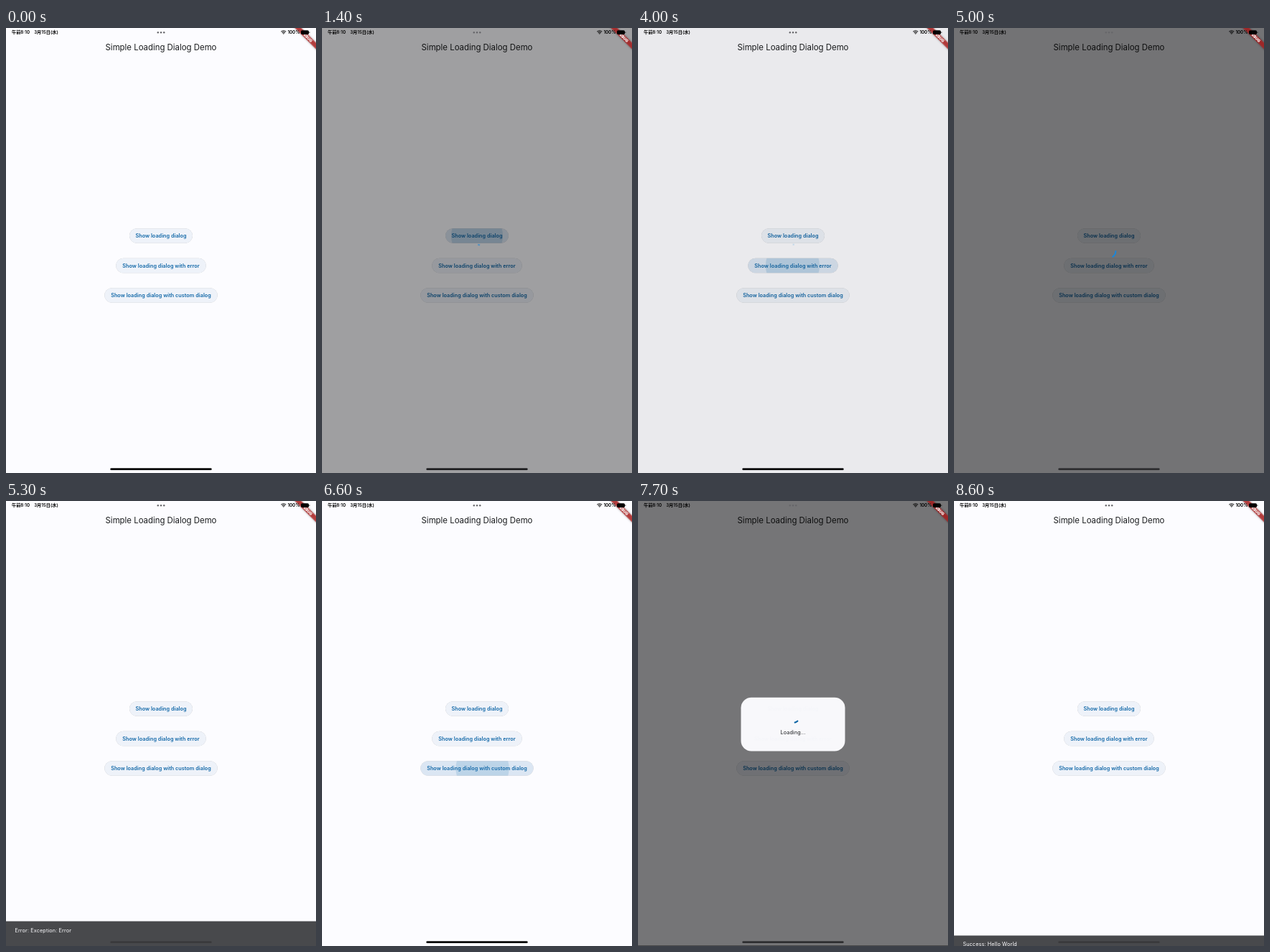
These frames come from a looping animation (432 by 620 pixels, 8.7 s). An HTML page:

```html
<!DOCTYPE html>
<html lang="en">
<head>
<meta charset="utf-8">
<title>Simple Loading Dialog Demo</title>
<style>
  html, body { margin: 0; width: 100%; height: 100%; overflow: hidden; background: #fcfcff; }
  svg { display: block; width: 432px; height: 620px; }
  text { font-family: Inter, "Noto Sans CJK JP", "Noto Sans CJK", sans-serif; fill: #1a1c1e; }
  .mid { text-anchor: middle; }
  .pill { fill: #eef2f9; filter: drop-shadow(0 .6px .5px rgba(0, 0, 0, .28)); }
  .label { font-size: 7.25px; font-weight: 600; fill: #1268a8; letter-spacing: .03px; }
  .small { font-size: 7.25px; letter-spacing: .13px; }
  .status text { font-size: 6.2px; font-weight: 600; fill: #000; }
  .arc { fill: none; stroke-width: 2.07; stroke-linecap: square; }
</style>
</head>
<body>
<svg viewBox="0 0 432 620">
  <rect width="432" height="620" fill="#fcfcff"/>
  <text class="mid" x="216" y="31.3" font-size="11.4">Simple Loading Dialog Demo</text>
  <g id="buttons"></g>

  <g id="snack">
    <rect width="432" height="36" fill="#48494c"/>
    <text id="message" class="small" x="12.4" y="15" style="fill:#fcfcff"></text>
  </g>

  <rect id="barrier" width="432" height="620"/>

  <g id="plain"><path class="arc" stroke="#1b86d8"/></g>
  <g id="card">
    <rect x="143.5" y="273.8" width="145" height="74.6" rx="14.5" fill="#fcfcff"/>
    <path class="arc" stroke="#0061a4"/>
    <text class="small mid" x="216" y="325.3">Loading...</text>
  </g>

  <g transform="translate(432 0) rotate(45)">
    <rect x="-32" y="14.5" width="64" height="6.2" fill="#b71c1c" fill-opacity=".76"
      style="filter:drop-shadow(0 0 1.5px rgba(0,0,0,.5))"/>
    <text class="mid" y="19.5" font-size="5.3" font-weight="900" style="fill:#fff">DEBUG</text>
  </g>

  <g class="status">
    <text x="8" y="8.4">午前8:10</text>
    <text x="39.2" y="8.4">3月15日(水)</text>
    <g fill="#66666a">
      <circle cx="211.8" cy="6.2" r="1.2"/><circle cx="216" cy="6.2" r="1.2"/><circle cx="220.2" cy="6.2" r="1.2"/>
    </g>
    <g fill="none" stroke="#000" stroke-width="1.1">
      <path d="M383.4 5.2Q386.8 2.2 390.2 5.2M384.7 6.7Q386.8 4.9 388.9 6.7"/>
      <path d="M385.9 7.6h1.8l-.9 .9z" fill="#000" stroke-width=".4"/>
    </g>
    <text x="392.4" y="8.4">100%</text>
    <rect x="411" y="3.3" width="11" height="5.6" rx="1.7"/>
    <rect x="422.5" y="5.2" width=".8" height="1.9" rx=".4"/>
  </g>
  <rect id="home" x="145.3" y="613.2" width="141.4" height="2.9" rx="1.45"/>
</svg>

<script>
const LOOP = 8700, STEP = 100;
const $ = id => document.getElementById(id);
const clamp = x => Math.min(1, Math.max(0, x));
const mix = (a, b, k) => a + (b - a) * k;

// CSS-like cubic bezier, solved by bisection
const bezier = (x1, y1, x2, y2) => x => {
  if (x <= 0 || x >= 1) return clamp(x);
  const at = (a, b, u) => 3 * a * u * (1 - u) ** 2 + 3 * b * u * u * (1 - u) + u ** 3;
  let lo = 0, hi = 1;
  for (let i = 0; i < 24; i++) {
    const u = (lo + hi) / 2;
    if (at(x1, x2, u) < x) lo = u; else hi = u;
  }
  return at(y1, y2, lo);
};
const ease = bezier(.25, .1, .25, 1);
const easeOut = bezier(0, 0, .58, 1);
const fastSlow = bezier(.4, 0, .2, 1);

const buttons = [
  ["Show loading dialog", 88, 289.5],
  ["Show loading dialog with error", 125.6, 331],
  ["Show loading dialog with custom dialog", 157.4, 372.5],
].map(([label, w, y], i) => {
  const box = `x="${216 - w / 2}" y="${y - 10.35}" width="${w}" height="20.7" rx="10.35"`;
  $("buttons").insertAdjacentHTML("beforeend", `
    <clipPath id="clip${i}"><rect ${box}/></clipPath>
    <rect class="pill" ${box}/>
    <g clip-path="url(#clip${i})" fill="#0061a4">
      <rect ${box} fill-opacity=".08"/>
      <circle cy="${y}" fill-opacity=".14"/>
    </g>
    <text class="label mid" x="216" y="${y + 2.5}">${label}</text>`);
  const ink = $("buttons").querySelectorAll("g")[i];
  return { ink, wave: ink.querySelector("circle"), reach: w / 2 };
});

// open and close: dialog; leave: snack bar starts to slide out; touch: x of the tap
const runs = [
  { open: 1340, close: 2350, leave: 3120, touch: 216, message: "Success: Hello World" },
  { open: 3982, close: 5050, leave: 5830, touch: 215, message: "Error: Exception: Error" },
  { open: 6600, close: 7680, leave: 8430, touch: 226, message: "Success: Hello World" },
];

function drawInk({ ink, wave, reach }, t, touch) {
  const grow = ease(clamp((t - 60) / 225));
  ink.setAttribute("opacity", clamp(t / 75) * (1 - clamp((t - 285) / 375)));
  wave.setAttribute("r", reach * mix(.3, 1, grow));
  wave.setAttribute("cx", mix(touch, 216, grow));
}

// Indeterminate progress arc: head runs ahead, then the tail catches up
function arc(t, cx, cy) {
  const r = 9.3, phase = t / 1333 % 1;
  const head = fastSlow(clamp(phase * 2)), tail = fastSlow(clamp(phase * 2 - 1));
  const a = Math.PI * (-.5 + tail * 1.5 + t / 2222 * 2 + phase * .5);
  const sweep = Math.max((head - tail) * 1.5 * Math.PI, .001);
  const point = q => `${cx + r * Math.cos(q)} ${cy + r * Math.sin(q)}`;
  return `M${point(a)}A${r} ${r} 0 ${+(sweep > Math.PI)} 1 ${point(a + sweep)}`;
}

function draw(t) {
  const i = t < 3700 ? 0 : t < 6300 ? 1 : 2;
  const { open, close, leave, touch, message } = runs[i];
  buttons.forEach((b, n) => drawInk(b, n === i ? t - open + 100 : 0, touch));

  const shown = clamp((t - open) / 150) - clamp((t - close) / 150);
  const shade = .54 * ease(shown);
  $("barrier").setAttribute("opacity", shade);
  ["plain", "card"].forEach((id, n) => {
    const on = n === +(i === 2);
    $(id).setAttribute("opacity", on ? easeOut(shown) : 0);
    $(id).querySelector("path").setAttribute("d", arc(Math.max(0, t - open), 216, n ? 299.7 : 311));
  });

  const rise = fastSlow(clamp((t - close) / 250) - clamp((t - leave) / 250));
  $("snack").setAttribute("transform", `translate(0 ${620 - 34.5 * rise})`);
  $("message").textContent = message;
  const tone = Math.round(Math.max(shade / .54 * 46, clamp(rise * 4) * 58));
  $("home").setAttribute("fill", `rgb(${tone},${tone},${tone + (tone ? 2 : 0)})`);
}

const start = performance.now();
function tick() {
  const t = (performance.now() - start) % LOOP;
  draw(Math.floor(t / STEP) * STEP);
  requestAnimationFrame(tick);
}
tick();
</script>
</body>
</html>
```
